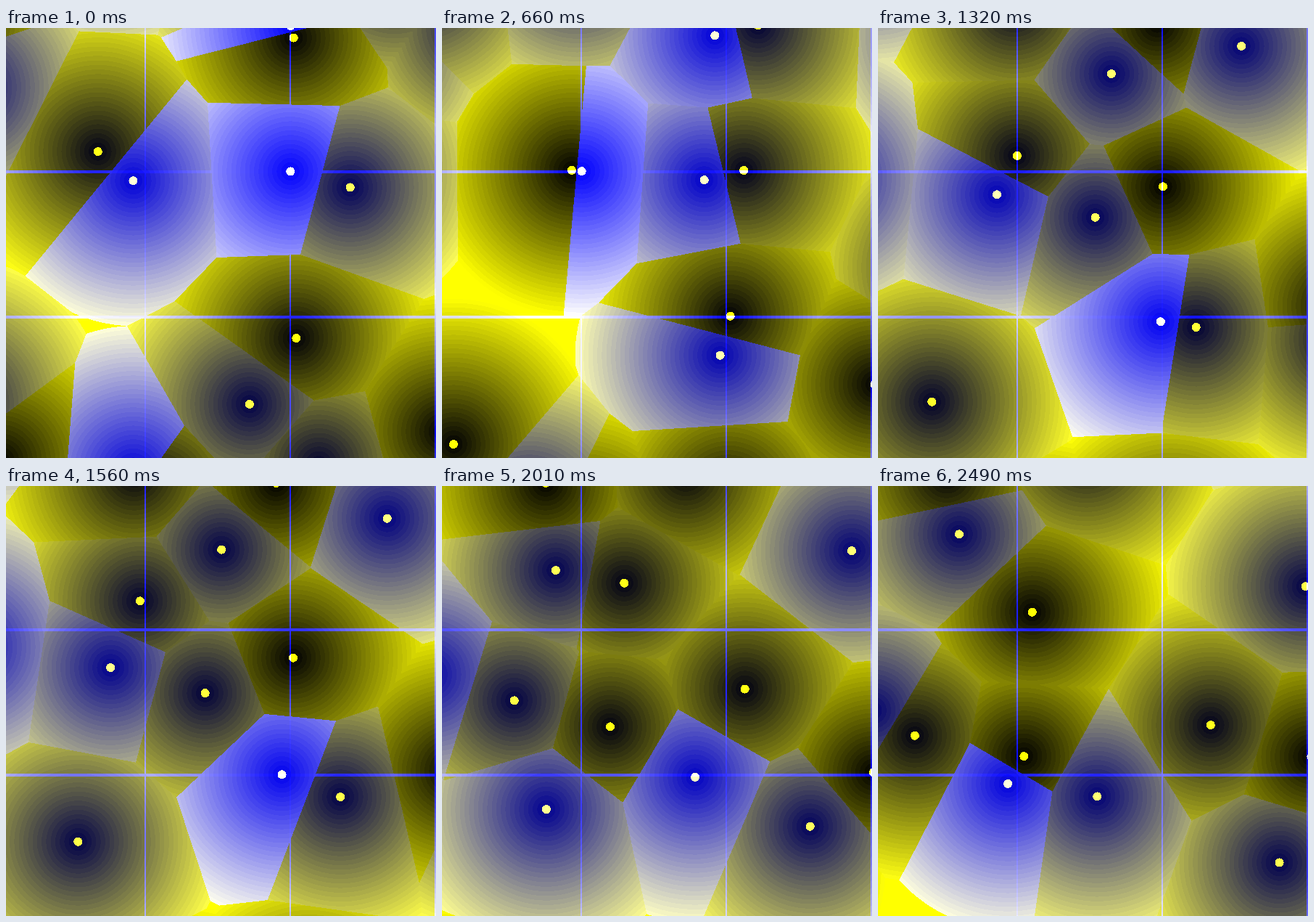
An HTML page with a canvas that plays this animation: 593x592 px, repeating every 2510 ms.

```html
<!DOCTYPE html>
<html lang="en">
<head>
<meta charset="utf-8">
<title>Cellular noise</title>
<style>
  html, body { margin: 0; width: 100%; height: 100%; overflow: hidden; background: #000; }
  canvas { display: block; }
</style>
</head>
<body>
<canvas id="stage" width="593" height="592"></canvas>
<script>
const W = 593, H = 592;
const TILE = 200, LEFT = -7, TOP = -4;   // tile size and grid origin
const SPEED = Math.PI / 3;               // radians per second
const LOOP = 2510;
const STEPS = [0, 150, 300, 420, 540, 660, 810, 930, 1050, 1170,
  1320, 1440, 1560, 1710, 1860, 2010, 2130, 2250, 2370, 2490];

const ctx = document.getElementById('stage').getContext('2d');
const f32 = Math.fround;

// Single-precision hash: the rounding decides the values.
function hash(x, y, a, b) {
  const dot = f32(f32(x * f32(a)) + f32(y * f32(b)));
  const v = f32(f32(Math.sin(dot)) * f32(43758.5453));
  return v - Math.floor(v);
}

// Columns and rows run from -1 to 3; hash rows count upwards.
const seeds = [];
for (let row = -1; row <= 3; row++) {
  for (let col = -1; col <= 3; col++) {
    const up = 2 - row;
    seeds.push({
      col, row,
      px: 2 * Math.PI * hash(col, up, 127.1, 311.7),
      py: 2 * Math.PI * hash(col, up, 269.5, 183.3)
    });
  }
}

function pointsAt(ms) {
  const phase = SPEED * ms / 1000 - Math.PI / 2;
  return seeds.map(s => {
    const u = 0.5 + 0.5 * Math.sin(phase + s.px);
    const v = 0.5 + 0.5 * Math.sin(phase + s.py);
    return {
      x: LEFT + TILE * (s.col + u),
      y: TOP + TILE * (s.row + 1 - v),
      blue: 255 * u * v
    };
  });
}

const band = v => v >= 255 ? 255 : Math.floor(v / 8) * 8 + 4;

function render(ms) {
  const image = ctx.createImageData(W, H);
  const data = image.data;
  const points = pointsAt(ms);

  function fillTile(col, row) {
    const near = [];
    for (let r = row; r < row + 3; r++) {
      for (let c = col; c < col + 3; c++) near.push(points[r * 5 + c]);
    }
    const x0 = LEFT + col * TILE, y0 = TOP + row * TILE;
    const x1 = Math.min(W, x0 + TILE), y1 = Math.min(H, y0 + TILE);
    for (let y = Math.max(0, y0); y < y1; y++) {
      for (let x = Math.max(0, x0); x < x1; x++) {
        let best = TILE * TILE, blue = 0;
        for (const p of near) {
          const dx = x + 0.5 - p.x, dy = y + 0.5 - p.y;
          const d = dx * dx + dy * dy;
          if (d < best) { best = d; blue = p.blue; }
        }
        const dist = Math.sqrt(best);
        const level = dist < 6 ? 255 : band(255 * dist / TILE);
        const onLine = x - x0 >= TILE - 2 || y - y0 < 4;
        const i = 4 * (y * W + x);
        data[i] = data[i + 1] = level;
        data[i + 2] = onLine ? 255 : blue;
        data[i + 3] = 255;
      }
    }
  }

  for (let row = 0; row < 3; row++) {
    for (let col = 0; col < 3; col++) fillTile(col, row);
  }
  return image;
}

const cache = [];
let shown = -1;

function show(ms) {
  let k = STEPS.length - 1;
  while (STEPS[k] > ms) k--;
  if (k === shown) return;
  shown = k;
  cache[k] = cache[k] || render(STEPS[k]);
  ctx.putImageData(cache[k], 0, 0);
}

const start = performance.now();
function tick() {
  show((performance.now() - start) % LOOP);
  requestAnimationFrame(tick);
}
tick();
</script>
</body>
</html>
```
